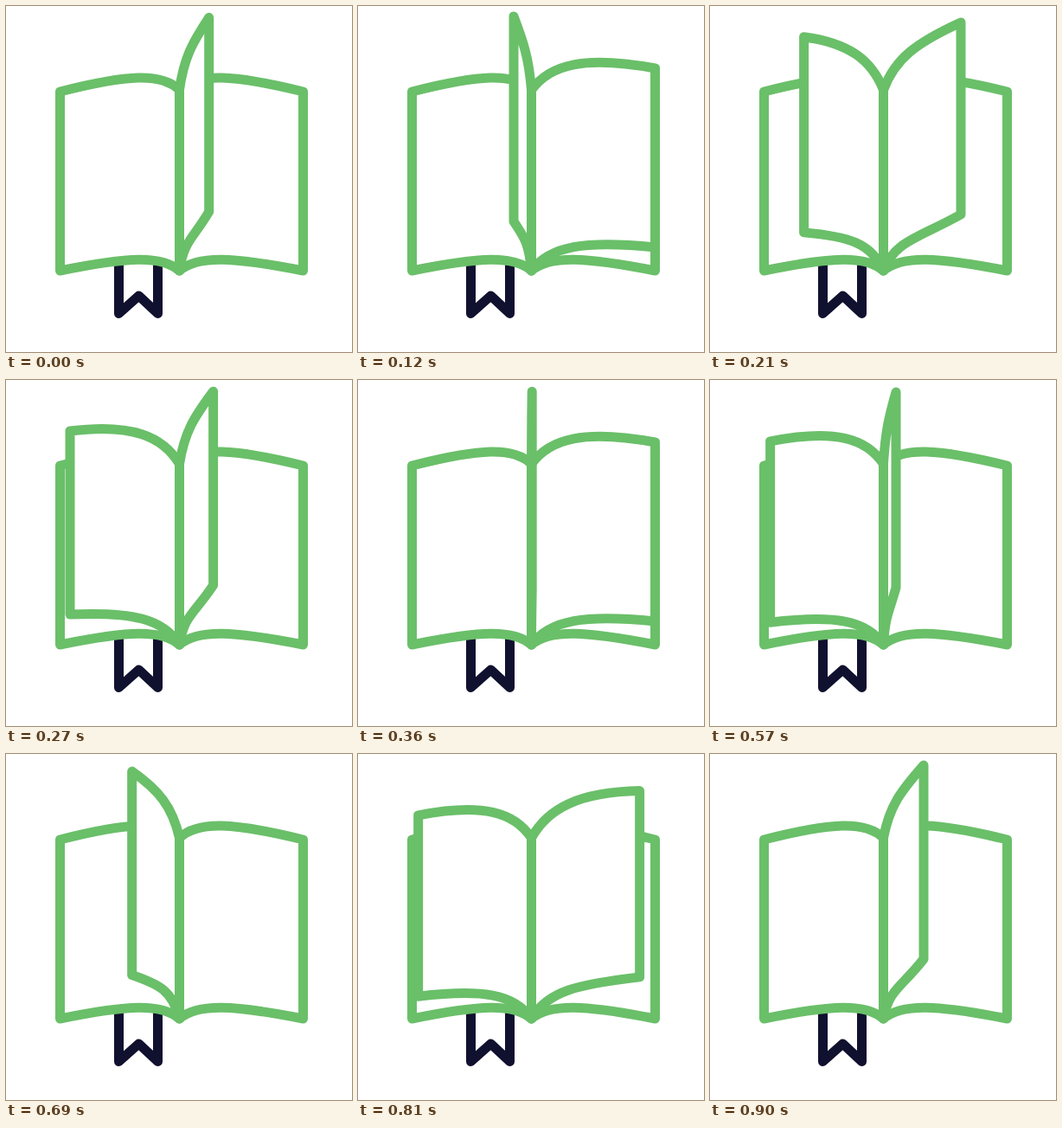
Recreate the animation shown at these times as an HTML page. Size 400 by 400 pixels, loop 930 ms.

```html
<!DOCTYPE html>
<html lang="en">
<head>
<meta charset="utf-8">
<title>Turning pages</title>
<style>
html, body { margin: 0; width: 100%; height: 100%; overflow: hidden; background: #fff; }
svg { display: block; width: 100vw; height: 100vh; }
path { stroke-width: 11; stroke-linecap: round; stroke-linejoin: round; }
.mark { fill: none; stroke: #10102f; }
.paper { fill: #fff; stroke: #6abf69; }
</style>
</head>
<body>
<svg viewBox="0 0 400 400">
  <path class="mark" d="M130.5 296V355.5L153.5 335L175.5 355.5V296"/>
  <g id="book"></g>
</svg>
<script>
const LOOP = 930, STEP = 30;
const STARTS = [75, 315, 723];
const SPINE = 200.5;
const TOP = { joint: 97, rest: 99, rise: 86, arch: 22 };
const FOOT = { joint: 306, rest: 306, rise: 69, arch: 18 };

// path of a page's outer edge: time, x, top y, foot y
const KEYS = [
  [0, 343.5, TOP.rest, FOOT.rest],
  [45, 343.5, 72, 279],
  [135, 290, 19, 241],
  [177, 247, 13, 237],
  [255, 215, 14, 240],
  [327, 180, 12, 249],
  [477, 74, 59, 271],
  [535, 62.5, TOP.rest, FOOT.rest]
];
const LAST = KEYS.length - 1;
const TURN = KEYS[LAST][0];

const rate = (i, k) => (KEYS[i + 1][k] - KEYS[i][k]) / (KEYS[i + 1][0] - KEYS[i][0]);

// the gentler neighbouring rate, so the motion never overshoots
function slope(i, k) {
  if (i === 0 || i === LAST) return 0;
  const a = rate(i - 1, k), b = rate(i, k);
  return a * b <= 0 ? 0 : Math.abs(a) < Math.abs(b) ? a : b;
}

function edgeAt(t) {
  let i = 0;
  while (i < LAST - 1 && t > KEYS[i + 1][0]) i++;
  const a = KEYS[i], b = KEYS[i + 1];
  const d = b[0] - a[0], u = (t - a[0]) / d, v = 1 - u;
  return [1, 2, 3].map(k =>
    a[k] * v * v * (1 + 2 * u) + b[k] * u * u * (3 - 2 * u) +
    d * u * v * (v * slope(i, k) - u * slope(i + 1, k)));
}

// control points from the spine to the outer edge; lifting bends the paper
function bend(x, y, { rest, rise, arch }) {
  const lift = Math.max(0, (rest - y) / rise);
  const reach = x - SPINE;
  return [
    [SPINE + 0.15 * reach, rest - arch - 17 * Math.sqrt(lift)],
    [SPINE + 0.43 * reach, y - arch + 2 + 50 * lift * lift]
  ];
}

function outline([x, top, foot]) {
  const [a, b] = bend(x, top, TOP);
  const [c, d] = bend(x, foot, FOOT);
  return `M${SPINE} ${TOP.joint}C${a} ${b} ${x} ${top}V${foot}` +
    `C${d} ${c} ${SPINE} ${FOOT.joint}Z`;
}

const book = document.getElementById("book");
function addSheet(d) {
  const el = document.createElementNS("http://www.w3.org/2000/svg", "path");
  el.setAttribute("class", "paper");
  el.setAttribute("d", d);
  return book.appendChild(el);
}

addSheet(outline(edgeAt(0)));
addSheet(outline(edgeAt(TURN)));
const sheets = STARTS.map(() => addSheet(""));

function draw(ms) {
  const t = Math.floor((ms % LOOP) / STEP) * STEP;
  const ages = STARTS.map(s => (t - s + LOOP) % LOOP)
    .filter(age => age < TURN)
    .sort((a, b) => a - b);
  sheets.forEach((el, i) =>
    el.setAttribute("d", i < ages.length ? outline(edgeAt(ages[i])) : ""));
}

let origin;
function tick(now) {
  if (origin === undefined) origin = now;
  draw(now - origin);
  requestAnimationFrame(tick);
}
draw(0);
requestAnimationFrame(tick);
</script>
</body>
</html>
```
